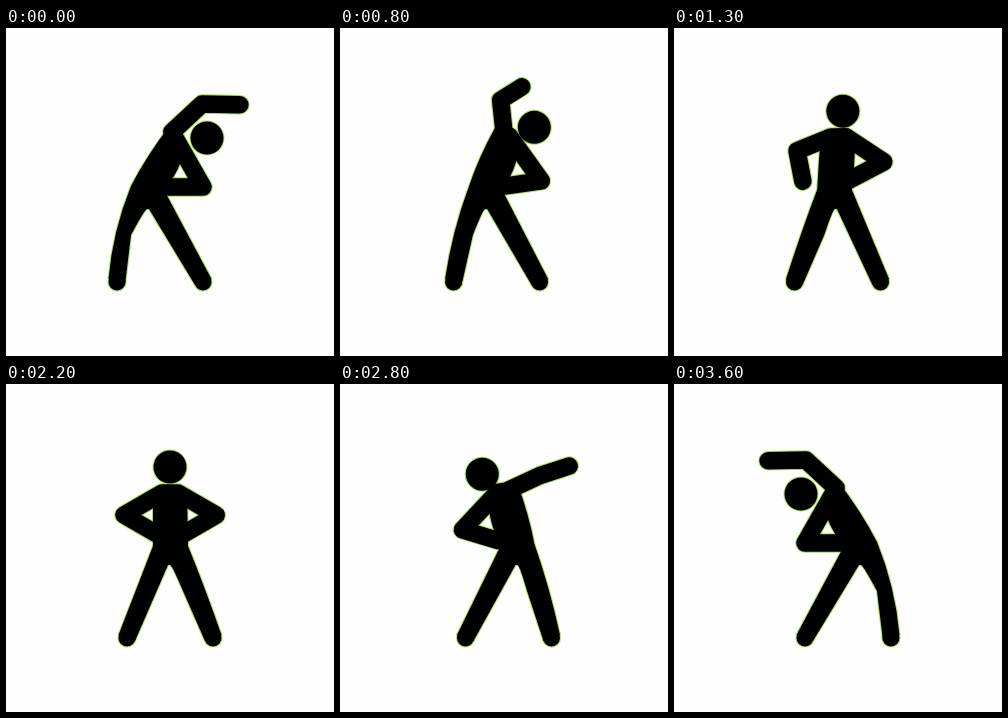
Animation of 328x328 px, one loop 3.7 s. Source, as an HTML page with a canvas:

```html
<!DOCTYPE html>
<html lang="en">
<head>
<meta charset="utf-8">
<title>Side bend</title>
<style>
html, body { margin: 0; width: 100%; height: 100%; overflow: hidden; background: #fefefe; }
canvas { display: block; }
</style>
</head>
<body>
<canvas id="stage" width="328" height="328"></canvas>
<script>
const ctx = document.getElementById('stage').getContext('2d');
const SIZE = 328, LOOP = 3700, STEP = 100;

// key poses of the swinging arm: time, upper arm angle, forearm angle, forearm length
const SWING = [
  [2200, -30, -150, 44],
  [2500, -22, -101, 31],
  [2800, 25, 18, 31],
  [3000, 84, 148, 25],
  [3200, 112, 175, 33],
  [3500, 137, 181, 38]
];

const clamp = v => Math.min(1, Math.max(0, v));
const leanAt = t => Math.sin(clamp((t - 2420) / 950) * Math.PI / 2);

function swingAt(t) {
  let i = 0;
  while (i < SWING.length - 2 && t > SWING[i + 1][0]) i++;
  const a = SWING[i], b = SWING[i + 1];
  const p = clamp((t - a[0]) / (b[0] - a[0]));
  return a.map((v, k) => v + (b[k] - v) * p).slice(1);
}

function reach([x, y], degrees, length) {
  const angle = degrees * Math.PI / 180;
  return [x + length * Math.cos(angle), y - length * Math.sin(angle)];
}

function armsPath(t, lean) {
  const [upper, fore, length] = swingAt(t);
  const shoulder = [172 - 10 * lean, 109 - 5 * lean ** 2];
  const elbow = reach(shoulder, upper, 20 + 0.55 * length);
  const path = new Path2D();
  // hand on hip, across the shoulders, out to the swinging hand
  path.lineTo(156 + 11 * lean ** 3, 153 + 6 * lean);
  path.lineTo(118 + 13 * lean ** 2, 131 + 21 * lean + 7 * lean ** 2);
  path.lineTo(156 + 4 * lean ** 2, 109 - lean);
  path.lineTo(...shoulder);
  path.lineTo(...elbow);
  path.lineTo(...reach(elbow, fore, length));
  return path;
}

function bodyPath(lean, footL, footR) {
  const bend = lean ** 2;
  const side = [181 - 18 * lean ** 4, 107 - 11 * bend];
  const hip = [182 + 21 * lean, 162 - 4 * lean];
  const crotch = 164 + 23 * lean;
  const path = new Path2D();
  path.moveTo(...side);
  path.quadraticCurveTo((side[0] + hip[0]) / 2 + 4 * lean, (side[1] + hip[1]) / 2, ...hip);
  path.quadraticCurveTo((hip[0] + footR + 8.5) / 2 + 7 * bend, 203, footR + 8.5, 251);
  path.lineTo(footR - 8, 257);
  path.lineTo(footR - 30 + 16 * bend, 207);
  path.quadraticCurveTo(crotch + 2, 181, crotch, 181);
  path.lineTo(crotch - 2, 181);
  path.lineTo(footL + 8, 257);
  path.lineTo(footL - 8.5, 251);
  path.lineTo(147 + 23 * lean, 162);
  path.quadraticCurveTo(147, 134, 147 + 4 * bend, 111);
  path.closePath();
  return path;
}

function buildFigure(t) {
  const lean = leanAt(t);
  const middle = 164 + 10 * lean ** 1.5;
  const footL = middle - 43, footR = middle + 43;
  const rounds = new Path2D();
  const dot = (x, y, r) => {
    rounds.moveTo(x + r, y);
    rounds.arc(x, y, r, 0, 7);
  };
  dot(164 - 37 * lean, 83 + 27 * lean ** 2.5, 16.5);
  dot(footL, 254, 8.5);
  dot(footR, 254, 8.5);
  return { arms: armsPath(t, lean), body: bodyPath(lean, footL, footR), rounds };
}

function paint({ arms, body, rounds }, color, rim) {
  ctx.fillStyle = ctx.strokeStyle = color;
  ctx.lineWidth = 17.5 + rim;
  ctx.stroke(arms);
  for (const shape of [body, rounds]) {
    ctx.fill(shape);
    if (rim) {
      ctx.lineWidth = rim;
      ctx.stroke(shape);
    }
  }
}

function draw(now) {
  const t = Math.floor(now % LOOP / STEP) * STEP;
  const mirrored = t < 1800;
  ctx.setTransform(1, 0, 0, 1, 0, 0);
  ctx.fillStyle = '#fefefe';
  ctx.fillRect(0, 0, SIZE, SIZE);
  if (mirrored) ctx.setTransform(-1, 0, 0, 1, SIZE, 0);
  ctx.lineCap = ctx.lineJoin = 'round';
  // the return is the rise played backwards on the other side
  const figure = buildFigure(mirrored ? 3800 - t : t);
  paint(figure, '#a9e052', 2);
  paint(figure, '#000', 0);
}

const start = performance.now();
function tick() {
  draw(performance.now() - start);
  requestAnimationFrame(tick);
}
tick();
</script>
</body>
</html>
```
